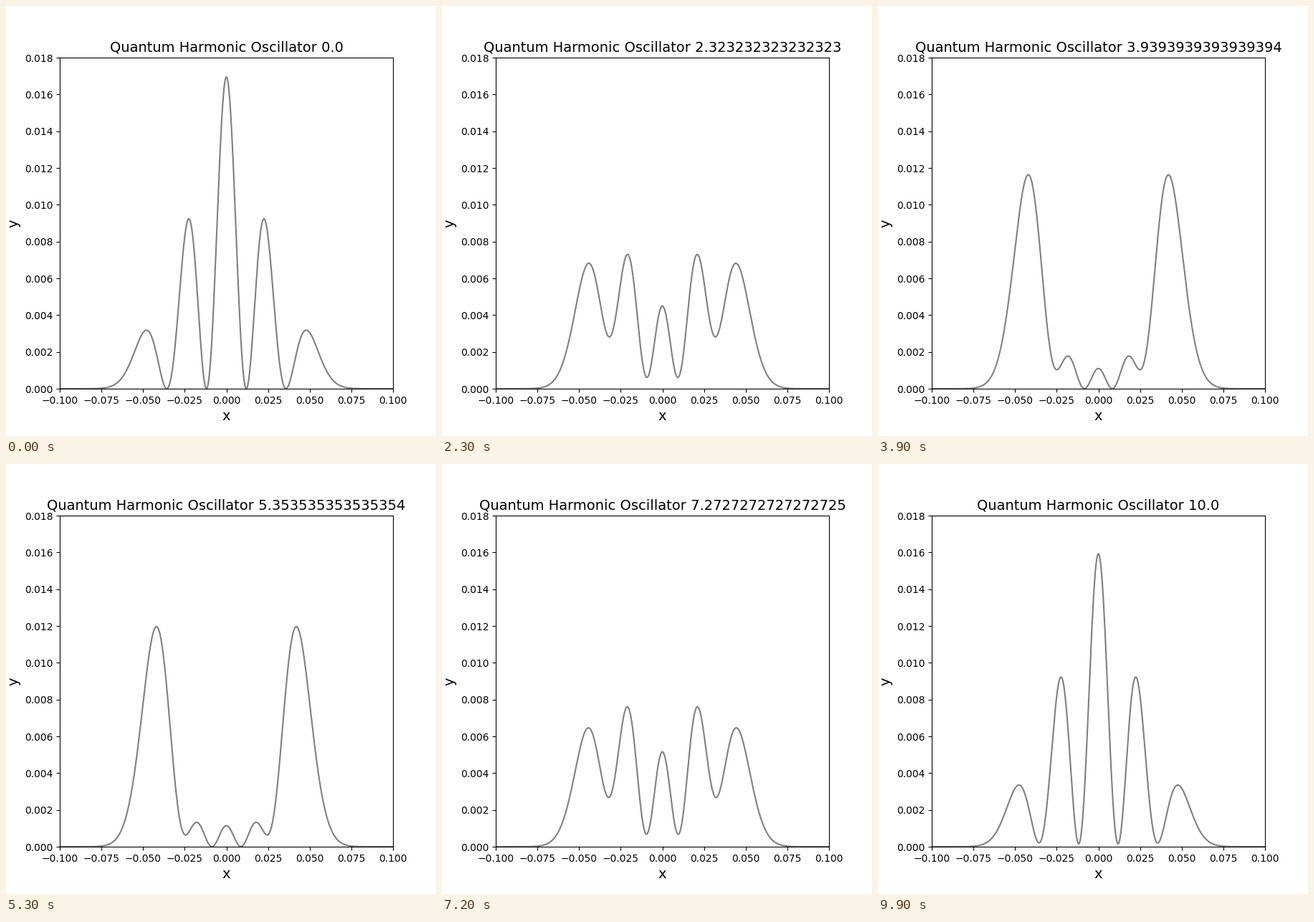
A matplotlib script that plays this animation: 600 px wide and 600 px high, repeating every 10000 ms.

```python
import numpy as np
import matplotlib.pyplot as plt
from matplotlib.animation import FuncAnimation

FRAMES = 100
WIDTH = 0.0186                # oscillator length
RATE = 2 * np.pi / 9.478      # phase rate between neighbouring even levels
C0, C2, C4 = 0.0190, -0.0669, 0.1043

times = np.linspace(0, 10, FRAMES)
x = np.linspace(-0.1, 0.1, 1001)

# Even oscillator eigenstates n = 0, 2, 4
q = (x / WIDTH) ** 2
envelope = np.exp(-q / 2)
state0 = C0 * envelope
state2 = C2 * (4 * q - 2) / np.sqrt(8) * envelope
state4 = C4 * (16 * q**2 - 48 * q + 12) / np.sqrt(384) * envelope


def density(t):
    step = np.exp(-1j * RATE * t)
    return np.abs(state0 + state2 * step + state4 * step**2) ** 2


fig, ax = plt.subplots(figsize=(6, 6), dpi=100)
ax.set_xlim(-0.1, 0.1)
ax.set_ylim(0, 0.018)
ax.set_xlabel("x", fontsize=14)
ax.set_ylabel("y", fontsize=14)
title = ax.set_title("", fontsize=14)
line, = ax.plot(x, density(0), color="gray", lw=1.5)


def update(i):
    t = float(times[i])
    line.set_ydata(density(t))
    title.set_text(f"Quantum Harmonic Oscillator {t}")
    return line, title


anim = FuncAnimation(fig, update, frames=FRAMES, interval=100,
                     repeat=True, repeat_delay=0, blit=False)
plt.show()
```
